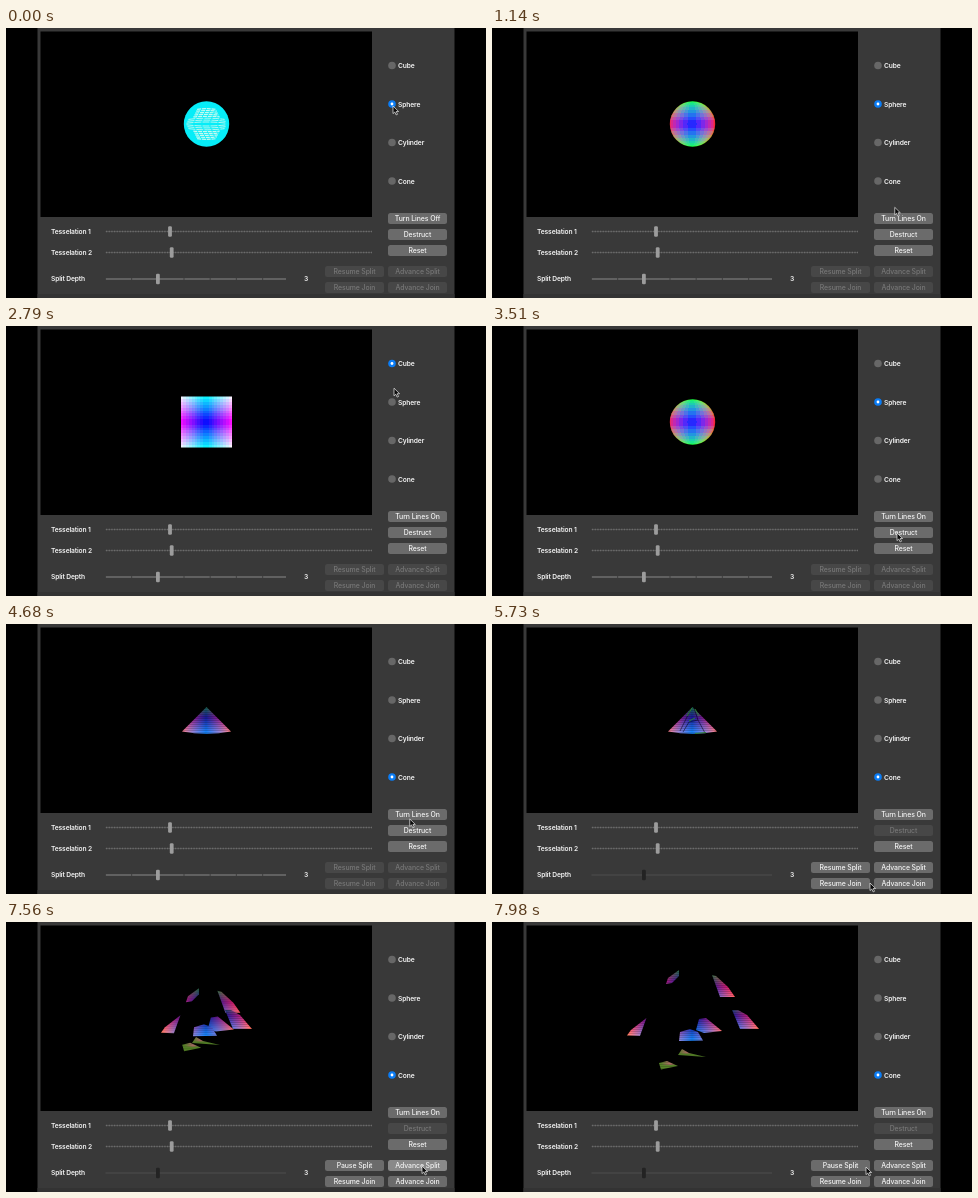
An HTML page with a canvas for the animation above (8 s loop, 480 by 270 pixels).

```html
<!DOCTYPE html>
<html lang="en">
<head>
<meta charset="utf-8">
<title>Shape tessellation panel</title>
<style>
html, body { margin: 0; width: 100%; height: 100%; overflow: hidden; background: #000; }
#stage { position: relative; width: 480px; height: 270px; overflow: hidden; }
#stage > * { position: absolute; left: 0; top: 0; }
text { font: 600 6.7px Inter, Roboto, sans-serif; letter-spacing: -.14px; fill: #f4f4f4; }
.btn rect { fill: #6b6b6b; }
.btn text { font-weight: 500; font-size: 6.9px; letter-spacing: -.08px; text-anchor: middle; }
.btn.off rect { fill: #474747; }
.btn.off text { fill: #777; }
.btn.down rect { fill: #898989; }
.radio circle { fill: #676767; }
.radio .dot { fill: none; }
.radio.on circle { fill: #0a7cf5; }
.radio.on .dot { fill: #fff; }
.track { stroke: #4e4e4e; stroke-width: 1.2; }
.notch { stroke: #6c6c6c; stroke-width: 1.5; }
.thumb { fill: #9c9c9c; }
.locked .thumb { fill: #232323; }
.locked .notch { display: none; }
</style>
</head>
<body>
<div id="stage">
  <svg id="ui" width="480" height="270">
    <rect x="31.5" width="417" height="270" fill="#393939"/>
    <rect x="31.5" y="266" width="417" height="4" fill="#333"/>
    <rect x="34.5" y="3.5" width="331.5" height="185.500" fill="#000"/>
  </svg>
  <canvas id="view" width="480" height="189"></canvas>
  <svg width="480" height="270">
    <path id="cursor" d="M0 0V7.6L1.8 6L3.1 8.9L4.5 8.3L3.2 5.5H5.6Z" fill="#0a0a0a" stroke="#eee" stroke-width=".7"/>
  </svg>
</div>
<script>
const LOOP = 8000, CX = 200.5, CY = 96;
const CUBE = 0, SPHERE = 1, CYLINDER = 2, CONE = 3;
const LINES_OFF = 900, DESTRUCT = 4900, SPLIT = 6500;
const ui = document.getElementById('ui');
const cursor = document.getElementById('cursor');
const ctx = document.getElementById('view').getContext('2d');

function add(parent, tag, attrs, label) {
  const el = document.createElementNS('http://www.w3.org/2000/svg', tag);
  for (const k in attrs) el.setAttribute(k, attrs[k]);
  if (label) el.textContent = label;
  parent.appendChild(el);
  return el;
}

function button(x, y, label) {
  const g = add(ui, 'g', { class: 'btn' });
  add(g, 'rect', { x, y, width: 59, height: 11, rx: 2.5 });
  const text = add(g, 'text', { x: x + 29.5, y: y + 7.9 }, label);
  return (name, state) => {
    if (text.textContent !== name) text.textContent = name;
    g.setAttribute('class', 'btn ' + state);
  };
}

const radioY = i => 37.5 + i * 38.5;
function radio(label, i) {
  const g = add(ui, 'g', { class: 'radio' }), y = radioY(i);
  add(g, 'circle', { cx: 386, cy: y, r: 3.8 });
  add(g, 'circle', { cx: 386, cy: y, r: 1.4, class: 'dot' });
  add(g, 'text', { x: 392, y: y + 2.5 }, label);
  return on => g.setAttribute('class', on ? 'radio on' : 'radio');
}

function slider(y, label, end, thumbX, dash) {
  const g = add(ui, 'g', {});
  add(g, 'text', { x: 45, y: y + 2.3 }, label);
  add(g, 'path', { class: 'track', d: `M99.5 ${y}H${end}` });
  add(g, 'path', { class: 'notch', d: `M100 ${y}H${end}`, 'stroke-dasharray': dash });
  add(g, 'rect', { class: 'thumb', x: thumbX, y: y - 5.3, width: 3.8, height: 10.6, rx: 1.3 });
  return g;
}

const radios = ['Cube', 'Sphere', 'Cylinder', 'Cone'].map(radio);
const lines = button(382, 185, 'Turn Lines Off');
const destruct = button(382, 201, 'Destruct');
button(382, 217, 'Reset');
const split = button(319, 238, 'Resume Split');
const nextSplit = button(382, 238, 'Advance Split');
const join = button(319, 254, 'Resume Join');
const nextJoin = button(382, 254, 'Advance Join');
slider(203.5, 'Tesselation 1', 366, 162.1, '1.3 1.35');
slider(224.5, 'Tesselation 2', 366, 163.8, '1.3 1.35');
const depth = slider(251, 'Split Depth', 280, 150, '25 1.2');
add(ui, 'text', { x: 298, y: 253.3 }, '3');

// Per-pixel textures, coloured by absolute position
const SIZE = 64, HALF = SIZE / 2, R = 22.7;
const { abs, asin, sin, cos, sqrt, floor, max, min } = Math;
const clamp = (v, a, b) => max(a, min(b, v));
const snap = (v, n) => (floor(v * n) + .5) / n;
const smooth = x => x * x * (3 - 2 * x);

function texture(color) {
  const c = document.createElement('canvas');
  c.width = c.height = SIZE;
  const g = c.getContext('2d'), img = g.createImageData(SIZE, SIZE);
  for (let i = 0; i < SIZE * SIZE; i++) {
    const rgb = color(i % SIZE + .5 - HALF, floor(i / SIZE) + .5 - HALF);
    rgb.forEach((v, k) => img.data[i * 4 + k] = 255 * clamp(v, 0, 1));
    img.data[i * 4 + 3] = 255;
  }
  g.putImageData(img, 0, 0);
  return c;
}

const mesh = y => floor(y + SIZE) % 2 ? 1 : .82;
const sphereTex = texture((x, y) => {
  const lat = snap(asin(clamp(y / R, -1, 1)), 6);
  const lon = snap(asin(clamp(x / max(.5, sqrt(max(0, R * R - y * y))), -1, 1)), 5);
  const c = cos(lat);
  return [.06 + abs(sin(lon)) * c * .9, .08 + abs(sin(lat)) * .92, .16 + cos(lon) * c * .86];
});
const cylinderTex = texture((x, y) => {
  const lon = snap(asin(clamp(x / R, -1, 1)), 6);
  return [.06 + abs(sin(lon)) * .94, .06 + abs(snap(y / 25, 9)), .22 + cos(lon) * .8];
});
const cubeTex = texture((x, y) => [abs(snap(x / 25.5, 9)), abs(snap(y / 25.5, 9)), 1]);
const coneTex = texture((x, y) => {
  const v = clamp((y + 13.5) / 26, 0, 1), u = abs(x) / 25;
  return [.08 + u * .95, .1 + abs(v - .42) * .75, (.3 + .7 * v) * (1 - .5 * u * u)].map(k => k * mesh(y));
});
const baseTex = texture((x, y) => {
  const pink = max(0, 1 - abs(x + 5) / 9) * (y < 13);
  return [.34 + .35 * pink, .52 - .08 * pink, .16 + .25 * pink].map(k => k * mesh(y));
});

function clipped(path, tex) {
  ctx.save();
  ctx.clip(path);
  ctx.drawImage(tex, CX - HALF - .5, CY - HALF);
  ctx.restore();
}

const disc = new Path2D();
disc.arc(CX, CY, R, 0, 7);
const can = new Path2D('M178 73Q200.500 69 223 73V119.500Q200.500 123.500 178 119.500Z');
const box = new Path2D('M175 70.500H226V121.500H175Z');
const hill = new Path2D('M200.500 83L225 107.500Q200.500 112 176 107.500Z');
const cracks = new Path2D('M199 85L188 107M202 84L206 96L213 109M206 96L197 98L191 108');
const veins = new Path2D('M200 84L195 92M203 85L207 92M197 97L203 94M203 109.500L214 108.500');

// Dense latitude lines; broad near the equator, short and heavy further out
function wireSphere() {
  ctx.fillStyle = '#06edf8';
  ctx.fill(disc);
  ctx.strokeStyle = '#c5faf0';
  for (let d = 2; d < 16; d += 1.9) {
    const near = d < 7, w = near ? 21 - d / 2 : 17 - d / 2, bow = near ? 1.2 : .6;
    ctx.lineWidth = near ? .9 : 1.2;
    ctx.setLineDash(near ? [7, 1] : [4, .8]);
    for (const s of [-1, 1]) {
      ctx.beginPath();
      ctx.moveTo(CX - w, CY + s * (d - bow));
      ctx.quadraticCurveTo(CX, CY + s * (d + bow), CX + w, CY + s * (d - bow));
      ctx.stroke();
    }
  }
  ctx.setLineDash([]);
}

// Shards: spread outline, drift from the packed cone, surface
const shards = [
  ['M167 141L175 139L186 144L169 147.500Z', -17, 34, baseTex],
  ['M186 133L190 127L197 131L214 135Z', 0, 22.5, baseTex],
  ['M174 62L176 56L187 48V54L180 61Z', -11, -34, coneTex],
  ['M220 53L224 54L236 65L243 75H228Z', 16, -29, coneTex],
  ['M240 88H246L255 93L267 107H248Z', 39, 0, coneTex],
  ['M135 113.500L139 108L154.500 96L148 114Z', -37, 5, coneTex],
  ['M204 108L207 97L214 96L230 109L212 111Z', 4, 3, coneTex],
  ['M187 119L188 110L198 107L206 110L211 118.500Z', 0, 9, coneTex]
].map(([d, dx, dy, tex]) => ({ path: new Path2D(d), dx, dy, tex }));

function drawShards(s) {
  for (const { path, dx, dy, tex } of shards) {
    ctx.save();
    ctx.translate(dx * (s - 1), dy * (s - 1));
    ctx.clip(path);
    ctx.drawImage(tex, CX - HALF + dx - .5, CY - HALF + dy);
    ctx.restore();
  }
}

function spread(t) {
  const p = (t - 6930) / 1050;
  return p < 0 ? max(-.1, p / 4) : Math.pow(p, 1.52);
}

// Cursor stops: [arrival, x, y, shape clicked there]
const TRAVEL = 400, CLICK = 60;
const onRadio = (t, i) => [t, 388, radioY(i) + 1, i];
const stops = [
  [0, 387, 78, SPHERE], [850, 405, 189],
  onRadio(1450, CYLINDER), onRadio(2370, CUBE), onRadio(2960, SPHERE), [3510, 405, 207],
  onRadio(3950, CYLINDER), onRadio(4300, CONE), [4800, 408, 206],
  [5730, 378, 259], [6300, 351, 244], [6930, 392, 244], [7560, 416, 244], [7980, 374, 245]
];

function cursorAt(t) {
  const i = stops.findIndex(s => s[0] > t);
  if (i < 0) return stops[stops.length - 1].slice(1, 3);
  const [from, x, y] = stops[i - 1], [to, x2, y2] = stops[i];
  const leave = max(from + 90, to - TRAVEL);
  const p = smooth(clamp((t - leave) / (to - leave), 0, 1));
  return [x + (x2 - x) * p, y + (y2 - y) * p];
}

const shapeAt = t => stops.filter((s, i) => 3 in s && (!i || s[0] + CLICK <= t)).pop()[3];

function drawShape(shape, t) {
  ctx.clearRect(0, 0, 480, 189);
  if (shape === CUBE) clipped(box, cubeTex);
  else if (shape === CYLINDER) clipped(can, cylinderTex);
  else if (shape === SPHERE) t < LINES_OFF ? wireSphere() : clipped(disc, sphereTex);
  else if (t >= SPLIT) drawShards(spread(t));
  else {
    clipped(hill, coneTex);
    if (t < DESTRUCT) return;
    ctx.lineWidth = .9;
    ctx.strokeStyle = 'rgba(0,0,20,.6)';
    ctx.stroke(cracks);
    ctx.strokeStyle = '#2f8a2c';
    ctx.stroke(veins);
  }
}

function render(t) {
  const shape = shapeAt(t), broken = t >= DESTRUCT;
  const live = broken ? '' : 'off';
  radios.forEach((set, i) => set(i === shape));
  lines(t < LINES_OFF ? 'Turn Lines Off' : 'Turn Lines On', '');
  destruct('Destruct', broken ? 'off' : '');
  split(t < SPLIT ? 'Resume Split' : 'Pause Split', live);
  nextSplit('Advance Split', t >= 7500 && t < 7640 ? 'down' : live);
  join('Resume Join', live);
  nextJoin('Advance Join', live);
  depth.setAttribute('class', broken ? 'locked' : '');
  cursor.setAttribute('transform', `translate(${cursorAt(t)})`);
  drawShape(shape, t);
}

const start = performance.now();
function frame(now) {
  render(max(0, now - start) % LOOP);
  requestAnimationFrame(frame);
}
render(0);
requestAnimationFrame(frame);
</script>
</body>
</html>
```
